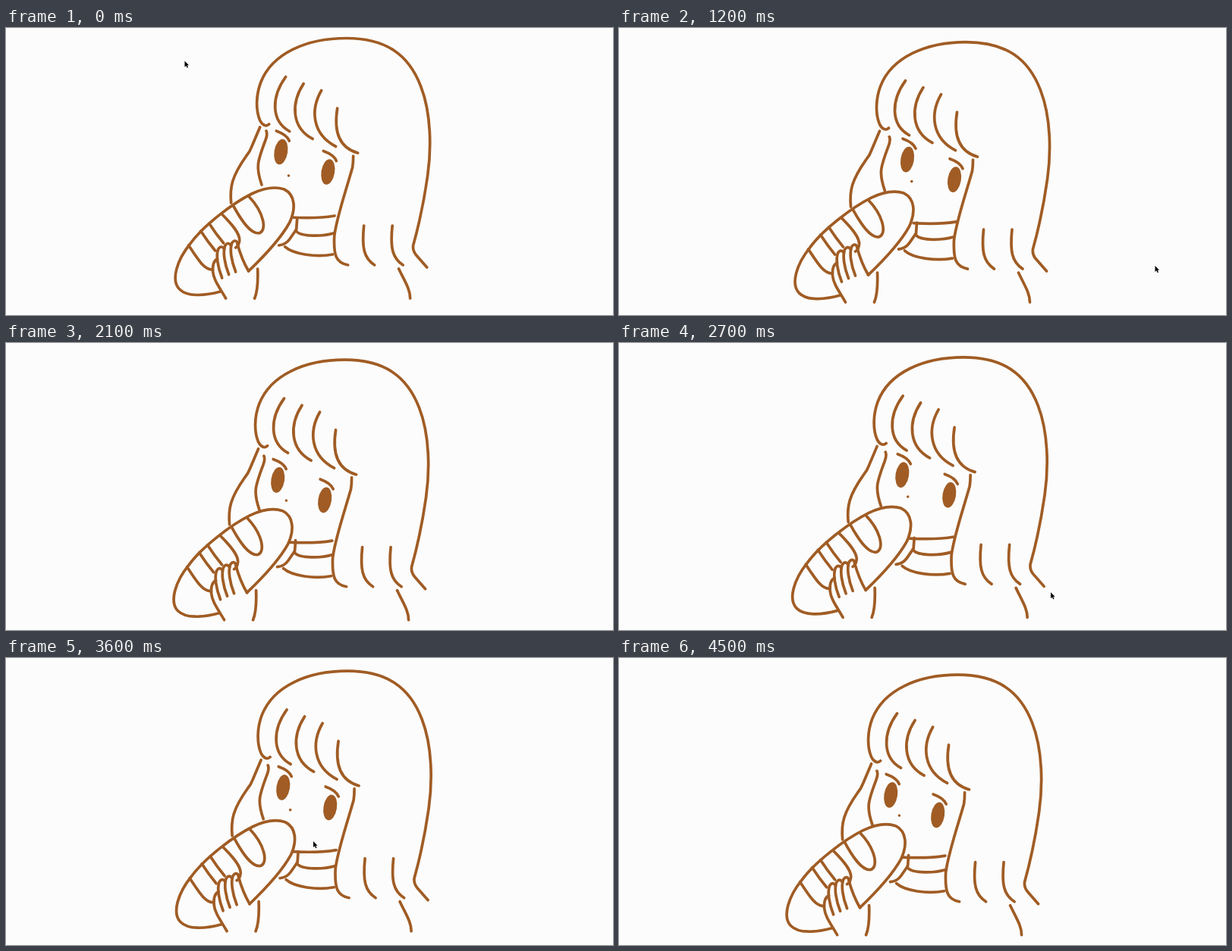
Animation of 800x379 px, one loop 5300 ms. Source, as an HTML page:

```html
<!DOCTYPE html>
<html lang="en">
<head>
<meta charset="utf-8">
<title>Bread girl</title>
<style>
  html, body { margin: 0; width: 100%; height: 100%; overflow: hidden; background: #fcfcfc; }
  svg { display: block; width: 800px; height: 379px; }
  .layer {
    --depth: 1;
    fill: none; stroke: #a05c24; stroke-width: 3.7;
    stroke-linecap: round; stroke-linejoin: round;
    transform: translate(calc(var(--x) * var(--depth) * 1px), calc(var(--y) * var(--depth) * 1px));
  }
  .mid { --depth: 1.5; }
  .near { --depth: 2; }
  .solid { fill: #a05c24; stroke: none; }
  .loaf { fill: #fcfcfc; }
  #cursor { fill: #000; stroke: #fff; stroke-width: 1; paint-order: stroke; }
</style>
</head>
<body>
<svg id="stage" viewBox="0 0 800 379">
  <!-- face outline and nose -->
  <g class="layer mid">
    <path d="M345 136Q347 140 344 148C333 177 331 184 339 207M377 250Q412 252 435 248"/>
    <circle class="solid" cx="374.500" cy="195" r="1.800"/>
  </g>
  <!-- eyes and brows -->
  <g class="layer near">
    <g id="eye">
      <path d="M359 136Q373 141 376 149"/>
      <ellipse class="solid" cx="365" cy="163.500" rx="8.800" ry="17" transform="rotate(9 365 163.500)"/>
    </g>
    <use href="#eye" x="62" y="26.500"/>
  </g>
  <g class="layer">
    <!-- hair -->
    <path d="M348 127C344 131 339 128 336 122C330 108 331 88 337 72C352 33 398 13.500 450 13.500S532 35 548 77C562 113 562 160 557 195C552 230 545 262 538 287Q537 294 542 300L556 316"/>
    <path id="fringe"/>
    <path d="M438 106C433 137 440 158 465 165"/>
    <path d="M336 131L325 157Q323 163 318 169C299 196 296 210 298 231"/>
    <path d="M459 169Q459 178 458 184C449 216 437 250 434 275C433 300 436 310 452 313"/>
    <path id="lock" d="M473 261C470 290 473 304 487 313"/>
    <use href="#lock" x="37.500"/>
    <!-- collar and shoulders -->
    <path d="M385 252L384 266L375 279Q370 286 361 287M383 267Q386 273 402 274Q420 275 433 271M369 289C380 299 410 303 432 299"/>
    <path d="M519 318C527 335 534 345 534 357M333 318Q334 345 329 357"/>
    <!-- bread -->
    <path class="loaf" d="M321 321C345 298 364 277 375 257C384 238 382 220 368 213Q350 207 325 219C301 231 262 260 244 285C227 306 218 333 230 345C240 355 262 354 284 348"/>
    <path d="M301 235C312 255 323 271 334 271C346 269 342 244 321 222"/>
    <path d="M286 246C300 260 310 272 309 281Q308 288 304 290M242 287C254 305 262 319 273 319"/>
    <path id="score" d="M269 258Q278 272 288 284"/>
    <use href="#score" x="-11" y="10"/>
    <!-- hand -->
    <path d="M291 357C283 343 275 333 274 322Q273 308 280 305"/>
    <path id="finger" d="M286 330C280 315 278 300 281 292Q285 286 289 292"/>
    <use href="#finger" x="9" y="-4.500"/>
    <use href="#finger" x="18" y="-8"/>
    <path d="M306 284Q312 306 321 321"/>
  </g>
  <path id="cursor" d="M0 0V8L1.900 6.300 3.200 9.200 4.500 8.600 3.300 5.800H5.600Z"/>
</svg>
<script>
  const LOOP = 5300, STEP = 100;
  const AWAY = [-25, 507];
  // the pointer's turning points: time, x, y
  const ROUTE = [
    [0, 235.5, 43.5], [600, 42, 310],
    [700, 404, 309.5], [1200, 706.5, 314], [1500, 780, 260],
    [1900, 440, 395], [2100, ...AWAY], [2400, ...AWAY],
    [2800, 767, 270], [3200, 213, 188], [3600, 405, 242],
    [4000, 808, 285], [4500, ...AWAY], [LOOP, ...AWAY]
  ];
  const stage = document.getElementById('stage');
  const cursor = document.getElementById('cursor');
  const start = performance.now();

  // each strand starts lower and sweeps further right than the last
  const strand = i =>
    `M${370 + 23.5 * i} ${64.5 + 9 * i}c${2 * i - 19} 26 ${4 * i - 20} 58 ${5 + 7 * i} ${72 + i}`;
  document.getElementById('fringe').setAttribute('d', [0, 1, 2].map(strand).join(''));

  function pointerAt(time) {
    const i = ROUTE.findIndex(([t]) => t > time);
    const [t0, x0, y0] = ROUTE[i - 1], [t1, x1, y1] = ROUTE[i];
    const p = (time - t0) / (t1 - t0);
    return [x0 + (x1 - x0) * p, y0 + (y1 - y0) * p];
  }

  // the girl follows the pointer, more strongly to the right of centre
  function draw() {
    const time = (performance.now() - start) % LOOP;
    const [x, y] = pointerAt(Math.floor(time / STEP) * STEP);
    stage.style.setProperty('--x', (x - 400) * (x > 400 ? 0.0245 : 0.008));
    stage.style.setProperty('--y', (y - 44) * 0.0188);
    cursor.setAttribute('transform', `translate(${x} ${y})`);
    requestAnimationFrame(draw);
  }
  draw();
</script>
</body>
</html>
```
